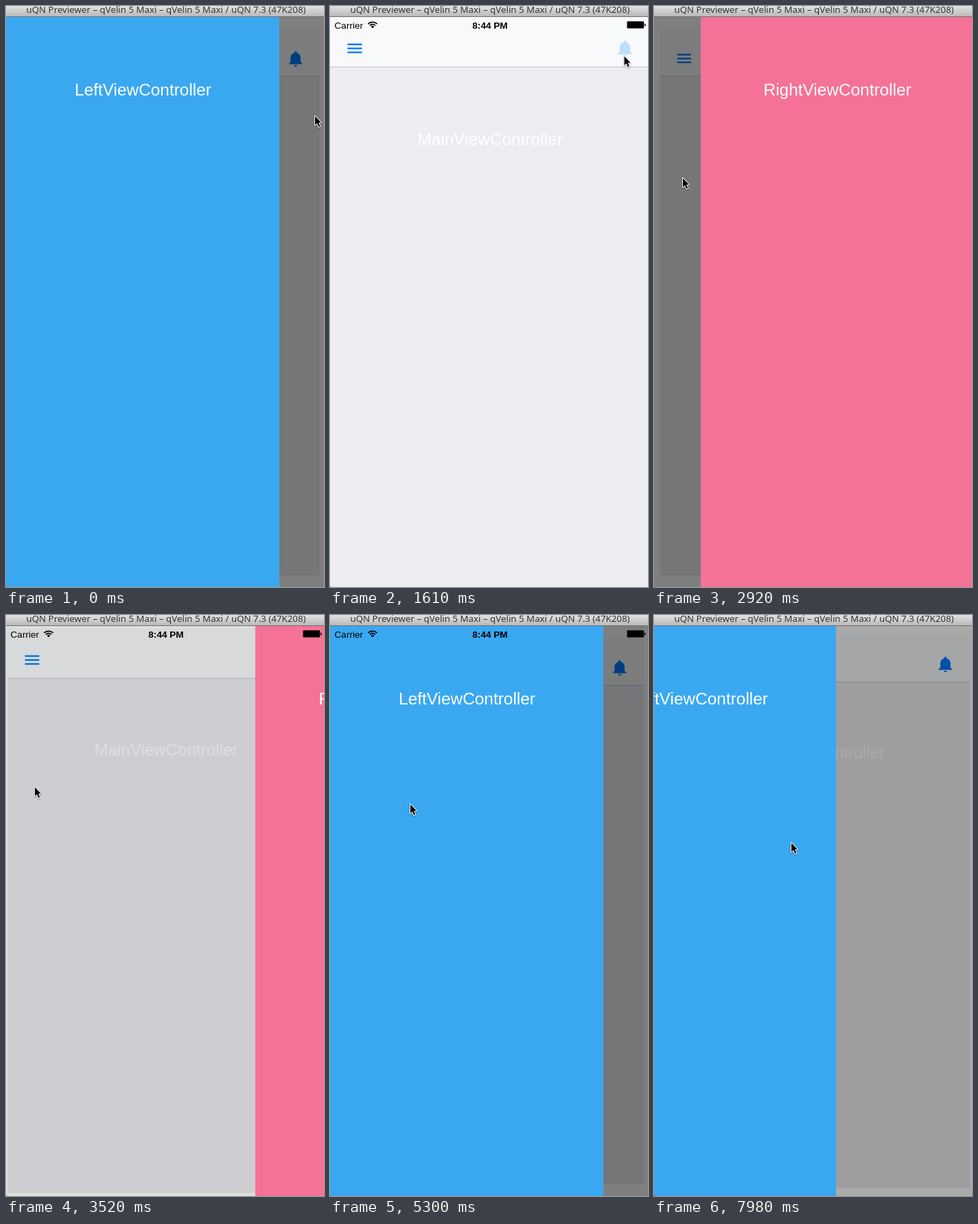
An HTML page with a canvas that plays this animation: 463 px wide and 844 px high, repeating every 8 s.

```html
<!DOCTYPE html>
<html lang="en">
<head>
<meta charset="utf-8">
<title>Slide menu demo</title>
<style>
html, body { margin: 0; width: 100%; height: 100%; overflow: hidden; background: #fff; }
canvas { display: block; width: 463px; height: 844px; }
</style>
</head>
<body>
<canvas id="stage" width="463" height="844"></canvas>
<script>
const ctx = document.getElementById('stage').getContext('2d');
const W = 463, H = 844, TOP = 16, LOOP = 8000;
const SCREEN_W = 466, PANEL_W = 398.4;
const CX = SCREEN_W / 2, CY = (TOP + H) / 2;
const SANS = '"Liberation Sans", Arial, sans-serif';

const bell = new Path2D('M11.5 22c1.1 0 2-.9 2-2h-4c0 1.1.9 2 2 2zm6.5-6v-5.5c0-3.07-2.13-5.64-5-6.32V3.5c0-.83-.67-1.5-1.5-1.5S10 2.67 10 3.5v.68c-2.87.68-5 3.25-5 6.32V16l-2 2v1h17v-1l-2-2z');
const menu = new Path2D('M3 18h18v-2H3zM3 13h18v-2H3zM3 8h18V6H3z');
const arrow = new Path2D('M0 0V13L3 10.4L5.3 15.6L7.3 14.8L5.1 9.6H9Z');

// Where the pointer rests, and when it travels there
const start = { x: 450, y: 160 };
const dragX = 333, closeDrag = 7230;
const moves = [
  { from: 700, to: 1600, x: 428.5, y: 73 },
  { from: 2060, to: 2900, x: 42, y: 250 },
  { from: 3970, to: 4540, x: 4, y: 271 },
  { from: 4877, to: 5280, x: 117, y: 275 },
  { from: 5500, to: closeDrag, x: dragX, y: 296 },
  { from: closeDrag, to: 7970, x: 200, y: 331 },
];

const ease = (t, from, length = 400) => {
  const p = Math.min(1, Math.max(0, (t - from) / length));
  return (1 - Math.cos(Math.PI * p)) / 2;
};

const beat = n => 144.9 * n + n * n / 20;

function lastBeat(t) {
  let n = 0;
  while (beat(n + 1) <= t) n++;
  return beat(n);
}

function pointerAt(t) {
  return moves.reduce((at, m) => {
    const p = ease(t, m.from, m.to - m.from);
    return { x: at.x + (m.x - at.x) * p, y: at.y + (m.y - at.y) * p };
  }, start);
}

function leftOpen(t, x) {
  if (t >= closeDrag) return 1 - (dragX - x) / PANEL_W;
  return 1 - ease(t, 330) + ease(t, 5000, 270);
}

const rightOpen = t => ease(t, 1650) - ease(t, 3242);

const statusHidden = t => t < 330 || (t > 1650 && t < 3242) || t >= closeDrag - 10;

function rect(color, x, y, w, h) {
  ctx.fillStyle = color;
  ctx.fillRect(x, y, w, h);
}

function text(str, x, y, font, color, align = 'center') {
  ctx.font = font;
  ctx.fillStyle = color;
  ctx.textAlign = align;
  ctx.fillText(str, x, y);
}

function icon(shape, x, y, middle, alpha = 1) {
  ctx.save();
  ctx.globalAlpha = alpha;
  ctx.translate(x, y);
  ctx.scale(1.17, 1.17);
  ctx.translate(-middle, -12);
  ctx.fillStyle = '#007aff';
  ctx.fill(shape);
  ctx.restore();
}

function mainView(open, pressed) {
  const s = 1 - 0.04 * open;
  ctx.save();
  ctx.translate(CX, CY);
  ctx.scale(s, s);
  ctx.translate(-CX, -CY);
  rect('#ecedf1', 0, TOP, SCREEN_W, H - TOP);
  rect('#f7f9fa', 0, TOP, SCREEN_W, 72);
  rect('#c3c5c7', 0, 88, SCREEN_W, 1);
  icon(menu, 36, 61.6, 12);
  icon(bell, 429.5, 62, 11.5, pressed ? 0.22 : 1);
  text('MainViewController', CX, 202, '24.4px ' + SANS, '#fff');
  ctx.restore();
  rect(`rgba(0,0,0,${0.5 * open})`, 0, TOP, W, H - TOP);
}

function panel(x, color, title) {
  const left = Math.round(x), right = Math.round(x + PANEL_W);
  rect(color, left, TOP, right - left, H - TOP);
  text(title, x + PANEL_W / 2 + 0.3, 130, '24.4px ' + SANS, '#fff');
}

function statusBar() {
  text('Carrier', 6.5, 32.5, '13.6px ' + SANS, '#000', 'left');
  text('8:44 PM', CX, 32.5, 'bold 13.6px ' + SANS, '#000');
  ctx.strokeStyle = ctx.fillStyle = '#000';
  ctx.lineWidth = 1.8;
  const fan = r => ctx.arc(62, 32.2, r, -Math.PI * 0.76, -Math.PI * 0.24);
  for (const r of [5.5, 8.9]) {
    ctx.beginPath();
    fan(r);
    ctx.stroke();
  }
  ctx.beginPath();
  ctx.moveTo(62, 32.2);
  fan(3.2);
  ctx.fill();
  ctx.beginPath();
  ctx.roundRect(432.5, 22.3, 24.5, 10.2, 1);
  ctx.roundRect(457.8, 25.5, 1.6, 4, 0.8);
  ctx.fill();
}

function titleBar() {
  const g = ctx.createLinearGradient(0, 0, 0, 15);
  g.addColorStop(0, '#e2e2e2');
  g.addColorStop(1, '#b9b9b9');
  rect(g, 0, 0, W, 15);
  rect('#707070', 0, 15, W, 1);
  text('uQN Previewer – qVelin 5 Maxi – qVelin 5 Maxi / uQN 7.3 (47K208)',
    CX, 10, '13.3px "Noto Sans", "Open Sans", sans-serif', '#333');
}

function pointer({ x, y }) {
  ctx.save();
  ctx.translate(x, y);
  ctx.shadowColor = 'rgba(0,0,0,.4)';
  ctx.shadowBlur = 2;
  ctx.shadowOffsetY = 1;
  ctx.strokeStyle = '#fff';
  ctx.lineJoin = 'round';
  ctx.lineWidth = 2;
  ctx.stroke(arrow);
  ctx.shadowColor = 'transparent';
  ctx.fillStyle = '#000';
  ctx.fill(arrow);
  ctx.restore();
}

function draw(t) {
  const at = pointerAt(t);
  const left = leftOpen(t, at.x), right = rightOpen(t);
  const bellPressed = t >= 1590 && t < 1740;
  rect('#fff', 0, 0, W, H);
  mainView(Math.max(left, right), bellPressed);
  if (left > 0) panel(PANEL_W * (left - 1), '#3aa8f1', 'LeftViewController');
  if (right > 0) panel(SCREEN_W - PANEL_W * right, '#f47296', 'RightViewController');
  if (!statusHidden(t)) statusBar();
  titleBar();
  rect('rgba(40,40,40,.6)', 0, H - 1, 1.5, 1);
  pointer(at);
}

const begin = performance.now();
function loop() {
  draw(lastBeat((performance.now() - begin) % LOOP));
  requestAnimationFrame(loop);
}
loop();
</script>
</body>
</html>
```
